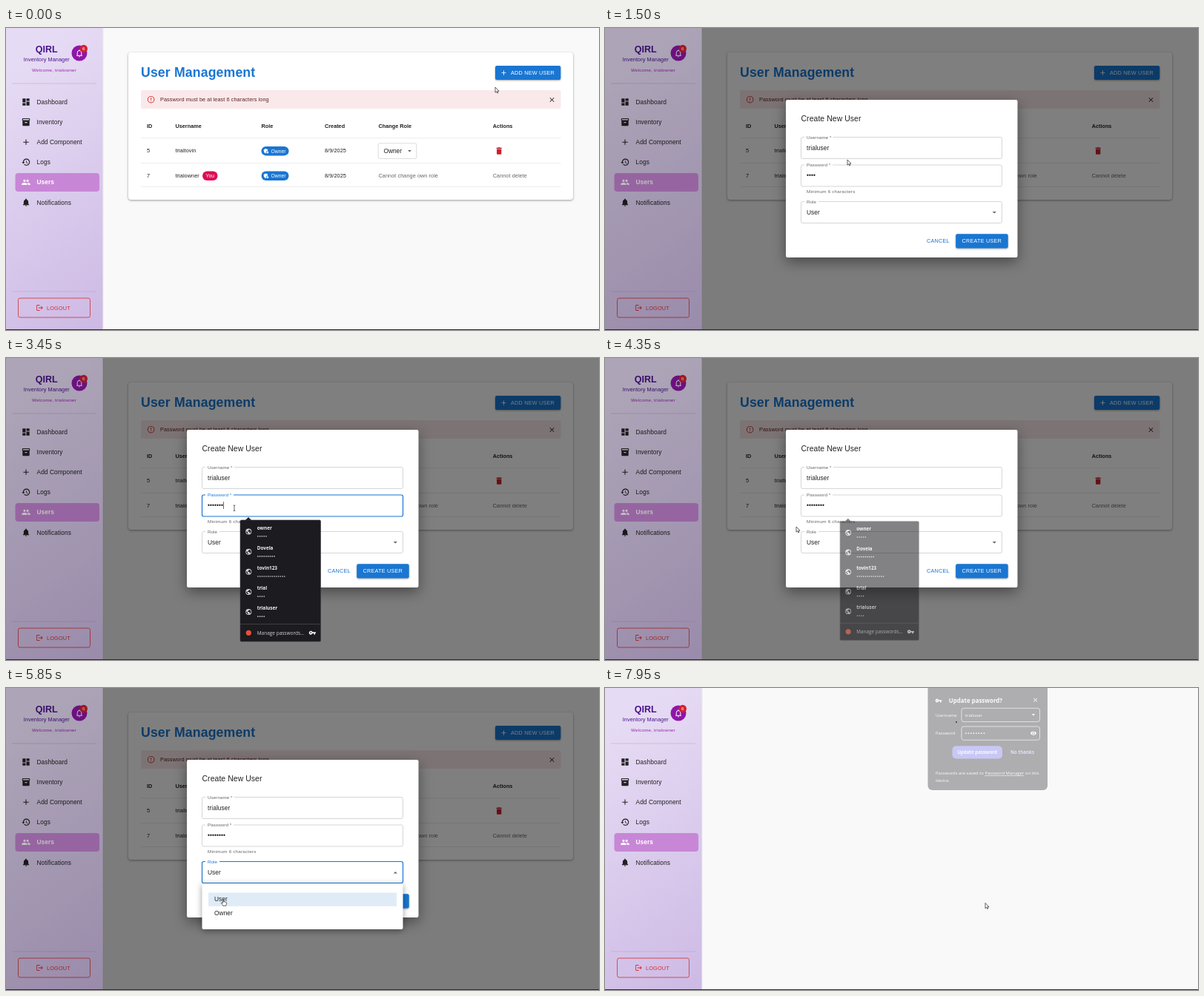
These frames come from a looping animation (800x408 px, 8 s). An HTML page:

```html
<!DOCTYPE html>
<html lang="en">
<head>
<meta charset="utf-8">
<title>User Management</title>
<style>
html, body { margin: 0; width: 100%; height: 100%; overflow: hidden; background: #f9f9f9; }
svg { display: block; width: 100vw; height: 100vh; font-family: 'Liberation Sans', Arial, sans-serif; }
text { white-space: pre; }
.native { font-family: 'Open Sans', 'Noto Sans', sans-serif; }
.card { filter: drop-shadow(0 1px 1.5px rgba(0,0,0,.38)); }
.raised { filter: drop-shadow(0 1px 1px rgba(0,0,0,.35)); }
.modal { filter: drop-shadow(0 6px 9px rgba(0,0,0,.42)); }
.menu { filter: drop-shadow(0 2px 4px rgba(0,0,0,.4)); }
</style>
</head>
<body>
<svg id="stage" viewBox="0 0 800 408"></svg>
<script>
const LOOP = 8000;
const BLUE = '#1976d2', DARK_BLUE = '#15529a', RED = '#d32f2f', INK = '#212121', GREY = '#666';

const ICON = {
  dashboard: 'M3 13h8V3H3v10zm0 8h8v-6H3v6zm10 0h8V11h-8v10zm0-18v6h8V3h-8z',
  box: 'M20 2H4c-1 0-2 .9-2 2v3.01c0 .72.43 1.34 1 1.69V20c0 1.1 1.1 2 2 2h14c.9 0 2-.9 2-2V8.7c.57-.35 1-.97 1-1.69V4c0-1.1-1-2-2-2zm-5 12H9v-2h6v2zm5-7H4V4h16v3z',
  add: 'M19 13h-6v6h-2v-6H5v-2h6V5h2v6h6v2z',
  history: 'M13 3c-4.97 0-9 4.03-9 9H1l3.89 3.89.07.14L9 12H6c0-3.87 3.13-7 7-7s7 3.13 7 7-3.13 7-7 7c-1.93 0-3.68-.79-4.94-2.06l-1.42 1.42C8.27 19.99 10.51 21 13 21c4.97 0 9-4.03 9-9s-4.03-9-9-9zm-1 5v5l4.28 2.54.72-1.21-3.5-2.08V8H12z',
  people: 'M16 11a3 3 0 100-6 3 3 0 000 6zM8 11a3 3 0 100-6 3 3 0 000 6zm0 2c-2.33 0-7 1.17-7 3.5V19h14v-2.5c0-2.33-4.67-3.5-7-3.5zm8 0c-.29 0-.62.02-.97.05 1.16.84 1.97 1.97 1.97 3.45V19h6v-2.5c0-2.33-4.67-3.5-7-3.5z',
  bell: 'M12 22c1.1 0 2-.9 2-2h-4c0 1.1.89 2 2 2zm6-6v-5c0-3.07-1.64-5.64-4.5-6.32V4a1.5 1.5 0 00-3 0v.68C7.63 5.36 6 7.92 6 11v5l-2 2v1h16v-1l-2-2z',
  logout: 'M17 7l-1.41 1.41L18.17 11H8v2h10.17l-2.58 2.58L17 17l5-5zM4 5h8V3H4c-1.1 0-2 .9-2 2v14c0 1.1.9 2 2 2h8v-2H4V5z',
  trash: 'M6 19c0 1.1.9 2 2 2h8c1.1 0 2-.9 2-2V7H6v12zM19 4h-3.5l-1-1h-5l-1 1H5v2h14V4z',
  alert: 'M11 15h2v2h-2zM11 7h2v6h-2zM12 2a10 10 0 100 20 10 10 0 000-20zm0 18a8 8 0 110-16 8 8 0 010 16z',
  close: 'M19 6.41L17.59 5 12 10.59 6.41 5 5 6.41 10.59 12 5 17.59 6.41 19 12 13.41 17.59 19 19 17.59 13.41 12z',
  drop: 'M7 10l5 5 5-5z',
  key: 'M12.65 10a6 6 0 100 4H17v4h4v-4h2v-4H12.65zM7 14a2 2 0 110-4 2 2 0 010 4z',
  globe: 'M12 2a10 10 0 100 20 10 10 0 000-20zm-1 17.93c-3.95-.49-7-3.85-7-7.93 0-.62.08-1.21.21-1.79L9 15v1c0 1.1.9 2 2 2v1.93zm6.9-2.54c-.26-.81-1-1.39-1.9-1.39h-1v-3c0-.55-.45-1-1-1H8v-2h2c.55 0 1-.45 1-1V7h2c1.1 0 2-.9 2-2v-.41c2.93 1.19 5 4.06 5 7.41 0 2.08-.8 3.97-2.1 5.39z',
  shield: 'M17 11c.34 0 .67.04 1 .09V6.27L10.5 3 3 6.27v4.91c0 4.54 3.2 8.79 7.5 9.82.55-.13 1.08-.32 1.6-.55A6 6 0 0117 11zM17 13a4 4 0 100 8 4 4 0 000-8z',
  eye: 'M12 5C7 5 2.7 8 1 12c1.7 4 6 7 11 7s9.300-3 11-7c-1.700-4-6-7-11-7zm0 12a5 5 0 110-10 5 5 0 010 10zm0-8a3 3 0 100 6 3 3 0 000-6z'
};

const icon = (name, cx, cy, size, fill, attrs = '') =>
  `<path d="${ICON[name]}" fill="${fill}" fill-rule="evenodd" transform="translate(${cx - size / 2} ${cy - size / 2}) scale(${size / 24})" ${attrs}/>`;
const text = (x, y, str, size, fill, attrs = '') =>
  `<text x="${x}" y="${y}" font-size="${size}" fill="${fill}" ${attrs}>${str}</text>`;
const rect = (x, y, w, h, r, fill, attrs = '') =>
  `<rect x="${x}" y="${y}" width="${w}" height="${h}" rx="${r}" fill="${fill}" ${attrs}/>`;
const line = (x1, y, x2, stroke, w = .6) =>
  `<path d="M${x1} ${y}H${x2}" stroke="${stroke}" stroke-width="${w}"/>`;
const dots = (x, y, n, fill, pitch = 2.75) =>
  `<path d="M${x + .9} ${y}h${(n - 1) * pitch + .1}" stroke="${fill}" stroke-width="1.7" stroke-linecap="round" stroke-dasharray="0 ${pitch}"/>`;
const spaced = em => `letter-spacing="${em}"`;
const bold = 'font-weight="700"', middle = 'text-anchor="middle"';

function sidebar() {
  const items = [['dashboard', 'Dashboard'], ['box', 'Inventory'], ['add', 'Add Component'],
    ['history', 'Logs'], ['people', 'Users'], ['bell', 'Notifications']];
  const nav = items.map(([name, label], i) => {
    const y = 100 + i * 27.1, on = label === 'Users';
    return (on ? rect(12.5, 196, 113.5, 25, 4, '#c887d6') : '') +
      icon(name, 27, y, 12.5, on ? '#fff' : INK) +
      text(41.5, y + 3, label, 8.33, on ? '#fff' : INK, spaced(.08) + (on ? bold : ''));
  }).join('');
  return rect(0, 0, 130.5, 408, 0, 'url(#lilac)') +
    text(54.7, 33, 'QIRL', 12.5, '#4a148c', bold + ' ' + middle) +
    text(54.8, 45, 'Inventory Manager', 7.29, '#4a148c', spaced(.08) + middle) +
    text(65, 59, 'Welcome, trialowner', 6.25, '#9c27b0', spaced(.18) + middle) +
    `<circle cx="99" cy="34" r="10.5" fill="#8e16a8"/>` +
    `<path d="M95.200 37.300h7.600M96.200 37v-3.500a2.800 3 0 015.600 0V37M99 30.300v-1" fill="none" stroke="#fff" stroke-width="1"/>` +
    `<path d="M98 38.500h2a1 1 0 01-2 0" fill="#fff"/>` +
    `<circle cx="104.800" cy="28" r="5.200" fill="#d3202f"/>` + text(104.8, 30.2, '6', 6.25, '#fff', middle) +
    line(8, 75, 122, '#c0a9c9') + nav + line(8, 356, 122, '#bba3cb') +
    rect(16.5, 365, 97, 26, 2.5, 'none', `stroke="${RED}" stroke-width=".8"`) +
    icon('logout', 45.5, 378, 10.4, RED) + text(55, 380.5, 'LOGOUT', 7.29, RED, spaced(.2));
}

function table() {
  const heads = [[190, 'ID'], [228.5, 'Username'], [344.5, 'Role'], [430, 'Created'], [502.5, 'Change Role'], [656.7, 'Actions']];
  const cell = (x, y, s, fill = INK) => text(x, y, s, 7.29, fill, spaced(.07));
  const row = (y, id, name) => cell(190, y, id) + cell(228.5, y, name) + cell(430, y, '8/9/2025') +
    rect(344.5, y - 8.5, 37, 12.5, 6.25, BLUE) + icon('shield', 351, y - 2.2, 8.6, '#fff') +
    text(357.5, y + .1, 'Owner', 6.77, '#fff');
  return heads.map(([x, s]) => text(x, 134.8, s, 7.29, INK, bold)).join('') +
    [148.7, 182.5, 214.5].map(y => line(182, y, 748.5, '#dfdfdf')).join('') +
    row(168.4, '5', 'trialtovin') + row(202, '7', 'trialowner') +
    rect(265, 193.5, 20.5, 12.5, 6.25, '#dc0d56') + text(275.2, 202.2, 'You', 6.77, '#fff', middle) +
    rect(502.2, 155.8, 51.6, 20.6, 2, '#fff', 'stroke="#c4c4c4" stroke-width=".6"') +
    text(509.500, 168.900, 'Owner', 8.33, INK) + icon('drop', 544.5, 166, 12, '#666') +
    icon('trash', 665.2, 166, 12.5, '#c9202f') +
    cell(502.5, 202, 'Cannot change own role', GREY) + cell(656.7, 202, 'Cannot delete', GREY);
}

const page = () =>
  rect(165, 33, 600, 199, 4, '#fff', 'id="card" class="card"') +
  text(182, 66.2, 'User Management', 17.7, BLUE, bold + ' ' + spaced(.13)) +
  rect(660, 51, 88.3, 19, 2.2, BLUE, 'id="addBtn" class="raised"') +
  icon('add', 671.5, 60.6, 10.4, '#fff') + text(681, 63.1, 'ADD NEW USER', 7.29, '#fff', spaced(.2)) +
  `<g id="error">` + rect(182, 84, 566.5, 25, 2, '#fae9ea') + icon('alert', 195.6, 96.7, 11.5, RED) +
  text(208, 99.2, 'Password must be at least 6 characters long', 7.29, '#5f2120', spaced(.08)) +
  icon('close', 736.5, 97, 10.4, INK) + `</g><g id="table">${table()}</g>`;

function field(id, y, label, notch) {
  return rect(264.5, y, 271, 29, 2.2, '#fff', `id="${id}Box"`) + rect(269, y - 1.5, notch, 4, 0, '#fff') +
    text(272, y + 2, label, 6.25, GREY, `id="${id}Label" ` + spaced(.06));
}

const dialog = () =>
  rect(244, 97, 312.5, 213, 2.2, '#fff', 'class="modal"') +
  text(264.5, 126, 'Create New User', 10.42, INK, spaced(.08)) +
  field('name', 147.5, 'Username *', 39) + field('pass', 185, 'Password *', 38) + field('role', 234.5, 'Role', 19) +
  text(272, 164.8, 'trialuser', 8.33, INK, spaced(.08)) +
  text(272, 202.2, '', 8.33, INK, 'id="secret" ' + spaced(.08)) +
  rect(284.3, 194.3, .7, 9.6, 0, INK, 'id="caret"') +
  text(272, 223, 'Minimum 6 characters', 6.25, GREY, spaced(.2)) +
  text(272, 252, 'User', 8.33, INK, spaced(.08)) + `<path id="arrow" fill="#666"/>` +
  text(434, 290.4, 'CANCEL', 7.29, BLUE, spaced(.2)) +
  rect(473.2, 278.2, 70.5, 19.2, 2.2, BLUE, 'id="createBtn" class="raised"') +
  text(481.6, 290.4, 'CREATE USER', 7.29, '#fff', spaced(.2));

const menu = () =>
  rect(264.5, 264, 271, 62, 2, '#fff', 'class="menu"') + rect(273, 276.5, 254, 18.3, 0, '#dfecf7', 'id="opt0"') +
  rect(273, 295, 254, 18.3, 0, '#fff', 'id="opt1"') +
  text(281, 288.4, 'User', 8.33, INK, spaced(.08)) + text(281, 307.2, 'Owner', 8.33, INK, spaced(.08));

function autofill() {
  const logins = [['owner', 5], ['Dovela', 9], ['tovin123', 14], ['trial', 4], ['trialuser', 4]];
  return `<path d="M322 220l5-5 5 5z" fill="#1c1b20"/>` +
    rect(316, 219, 108.5, 164, 1.5, '#1c1b20', 'stroke="#39383d" stroke-width=".6"') +
    logins.map(([name, n], i) => {
      const y = 234.6 + i * 27.1;
      return icon('globe', 327.3, y, 9.6, '#d2d2d4') + text(338.7, y - 3, name, 6.4, '#f2f2f2', bold) +
        dots(339, y + 6.2, n, '#c9c9cc');
    }).join('') + line(316, 359.5, 424.5, '#55545a') +
    `<circle cx="327.300" cy="371.300" r="3.600" fill="#e8503a"/>` +
    text(338.7, 373.8, 'Manage passwords…', 6.5, '#d0d0d3', 'textLength-none=""') + icon('key', 413.3, 371.2, 10, '#f2f2f2');
}

function bubble() {
  const white = '#fff', box = y => rect(481, y, 105.5, 18.3, 3, 'none', 'stroke="#f4f4f4" stroke-width=".7"');
  return rect(435.5, -6, 161.5, 144, 6, '#1f1e23') +
    icon('key', 450, 17, 9.5, white) + text(463.8, 20, 'Update password?', 7.9, white, bold) + icon('close', 580.6, 16, 9, white) +
    text(446, 38.8, 'Username', 5.9, white) + box(27.3) + text(486, 38.8, 'trialuser', 5.9, white) + icon('drop', 578, 36, 11, white) +
    text(446, 63, 'Password', 5.9, white) + box(52) + dots(486, 61.2, 8, white, 3.5) + icon('eye', 578, 61, 9, white) +
    rect(468.5, 78.3, 67.5, 17.2, 5, '#6d68f0') +
    text(502, 89.2, 'Update password', 6.2, white, bold + ' ' + middle) +
    text(563, 89.2, 'No thanks', 6.2, '#b9b5ff', bold + ' ' + middle) +
    text(446, 117.4, 'Passwords are saved to <tspan text-decoration="underline">Password Manager</tspan> on this', 5.95, white) +
    text(446, 127.2, 'device.', 5.95, white);
}

const cursors =
  `<path id="cur-arrow" d="M0 0V7.200L1.700 5.700 2.800 8 3.900 7.500 2.900 5.200H5z" fill="#fff" stroke="#222" stroke-width=".7"/>` +
  `<path id="cur-beam" d="M-1.300-2.200Q0-2.200 0-1.400Q0-2.200 1.300-2.200M0-1.400V5M-1.300 5.600Q0 5.600 0 4.800Q0 5.600 1.300 5.600" fill="none" stroke="#222" stroke-width=".7"/>` +
  `<path id="cur-hand" d="M-.7.700Q0-.4.700.7V3.500Q1.700 2.800 2.200 3.700 3.200 3.300 3.600 4.100 4.700 4 4.600 5.200C4.600 7 3.800 7.300 3.700 8.700H-.2C-.5 7.300-2 6.600-2.700 4.900-2.300 4.100-1.500 4.500-.7 5.500z" fill="#fff" stroke="#222" stroke-width=".7"/>`;

const stage = document.getElementById('stage');
stage.innerHTML =
  `<defs><linearGradient id="lilac" gradientUnits="userSpaceOnUse" x1="0" y1="60" x2="200" y2="340">
  <stop offset="0" stop-color="#e6dbf4"/><stop offset="1" stop-color="#cebbe5"/></linearGradient></defs>` +
  rect(0, 0, 800, 408, 0, '#f9f9f9') + rect(130.5, 0, .8, 408, 0, '#e2dfe6') + sidebar() +
  `<g id="page">${page()}</g><path id="spinner" d="M474 46h.01" stroke="#1f3f66" stroke-width="1.900" stroke-linecap="round"/>` +
  `<g id="backdrop">${rect(0, 0, 130.5, 408, 0, '#000', 'opacity=".25"')}${rect(130.5, 0, 669.5, 408, 0, '#000', 'opacity=".5"')}</g>` +
  `<g id="dialog">${dialog()}</g><g id="menu">${menu()}</g>` +
  `<g id="autofill" class="native">${autofill()}</g><g id="bubble" class="native">${bubble()}</g>` +
  rect(0, 407, 800, 1, 0, '#2b2b2e') + `<g id="cursor">${cursors}</g>`;

const $ = id => document.getElementById(id);
const set = (id, attrs) => { for (const k in attrs) $(id).setAttribute(k, attrs[k]); };
const show = (id, opacity) => set(id, { opacity, display: +opacity > 0 ? 'inline' : 'none' });
const ramp = (t, start, ms) => Math.min(1, Math.max(0, (t - start) / ms));
const ease = p => p * p * (3 - 2 * p);
const inside = (p, x, y, w, h) => p.x >= x && p.x <= x + w && p.y >= y && p.y <= y + h;

const AT = { open: 500, focus: 2150, blur: 4260, menu: 5250, pick: 6150, press: 7350, clear: 7385, reload: 7870, bubble: 7900 };
const KEYS = [2950, 3150, 3330, 3520];
const PATH = [[0, 660, 80], [350, 688, 62], [620, 688, 62], [1300, 327, 178], [1650, 327, 178], [2050, 308, 201],
  [3850, 308, 201], [4200, 258, 228], [4500, 258, 228], [5050, 330, 250], [5300, 330, 250], [5650, 293, 285.5],
  [6200, 293, 285.5], [6900, 513, 290.5], [8000, 513, 290.5]];

function pointer(t) {
  const i = PATH.findIndex(k => k[0] > t), [t0, x0, y0] = PATH[i - 1], [t1, x1, y1] = PATH[i];
  const p = ease((t - t0) / (t1 - t0));
  return { x: x0 + (x1 - x0) * p, y: y0 + (y1 - y0) * p };
}

function styleField(id, focused, hovered, labelBlue = focused) {
  set(id + 'Box', { stroke: focused ? BLUE : hovered ? INK : '#c4c4c4', 'stroke-width': focused ? 1.2 : .7 });
  set(id + 'Label', { fill: labelBlue ? BLUE : GREY });
}

function render(t) {
  const p = pointer(t), loading = t >= AT.reload;
  const live = t >= AT.open && !loading, menuOpen = t >= AT.menu && t < AT.pick;
  const free = live && !menuOpen;
  const cleared = t >= AT.clear;

  show('page', loading ? 0 : 1);
  show('error', cleared ? 0 : 1);
  set('table', { transform: `translate(0 ${cleared ? -33.7 : 0})` });
  set('card', { height: cleared ? 165.3 : 199 });
  show('spinner', t >= AT.reload + 40 ? 1 : 0);

  const fade = loading ? 0 : ease(ramp(t, AT.open, 225));
  show('backdrop', fade);
  show('dialog', fade);

  const over = {
    add: !live && !loading && inside(p, 660, 51, 88, 19),
    name: free && inside(p, 264.5, 147.5, 271, 29),
    pass: free && inside(p, 264.5, 185, 271, 29),
    role: free && inside(p, 264.5, 234.5, 271, 29),
    create: free && inside(p, 473, 278, 71, 19.5),
    opt0: menuOpen && inside(p, 273, 276.5, 254, 18.3),
    opt1: menuOpen && inside(p, 273, 295, 254, 18.3)
  };
  set('addBtn', { fill: over.add ? '#1565c0' : BLUE });
  set('createBtn', { fill: over.create ? DARK_BLUE : BLUE });
  set('opt1', { fill: over.opt1 ? '#f5f5f5' : '#fff' });

  const typing = t >= AT.focus && t < AT.blur;
  styleField('name', false, over.name);
  styleField('pass', typing, over.pass);
  styleField('role', t >= AT.menu && t < AT.press, over.role, t >= AT.menu && t < AT.press + 150);

  const count = 4 + KEYS.filter(k => t >= k).length;
  const sinceKey = t - Math.max(AT.focus, ...KEYS.filter(k => t >= k));
  $('secret').textContent = '•'.repeat(count);
  set('caret', { x: 272.300 + count * 3 });
  show('caret', typing && sinceKey % 1000 < 720 ? 1 : 0);
  set('arrow', { d: menuOpen ? 'M522.700 250.500l2.600-2.600 2.600 2.600z' : 'M522.700 248l2.600 2.600 2.600-2.600z' });

  const grow = ease(ramp(t, AT.menu, 200));
  show('menu', grow * (1 - ramp(t, AT.pick, 150)));
  set('menu', { transform: `translate(0 ${264 * (1 - (.6 + .4 * grow))}) scale(1 ${.6 + .4 * grow})` });

  const shut = ramp(t, AT.blur, 200), s = 1 - .045 * shut;
  show('autofill', ramp(t, AT.focus + 40, 120) * (1 - shut));
  set('autofill', { transform: `translate(${370 * (1 - s)} ${301 * (1 - s)}) scale(${s})` });
  show('bubble', ramp(t, AT.bubble, 150));

  const kind = over.name || over.pass ? 'beam'
    : over.add || over.role || over.create || over.opt0 || over.opt1 ? 'hand' : 'arrow';
  for (const k of ['arrow', 'beam', 'hand']) show('cur-' + k, k === kind ? 1 : 0);
  set('cursor', { transform: `translate(${p.x} ${p.y})` });
}

const start = performance.now();
function tick() {
  render((performance.now() - start) % LOOP);
  requestAnimationFrame(tick);
}
tick();
</script>
</body>
</html>
```
